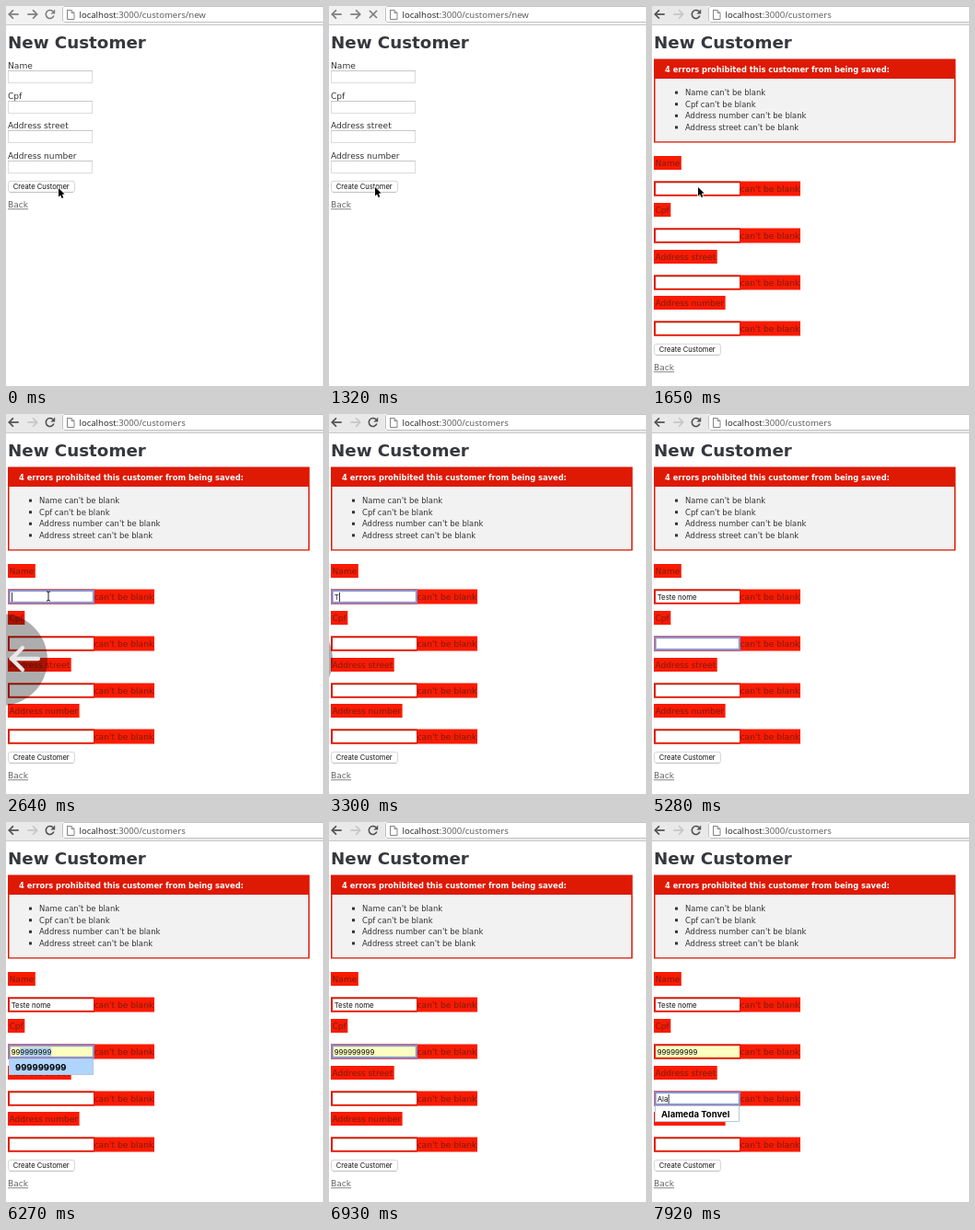
Recreate the animation shown at these times as an HTML page with a canvas. Size 344x413 px, loop 8 s.

```html
<!DOCTYPE html>
<html lang="en">
<head>
<meta charset="utf-8">
<title>New Customer</title>
<style>
html, body { margin: 0; width: 100%; height: 100%; overflow: hidden; background: #fff; }
canvas { display: block; width: 344px; height: 413px; }
</style>
</head>
<body>
<canvas id="stage"></canvas>
<script>
const W = 344, H = 413, LOOP = 8000, STEP = 330;
const canvas = document.getElementById('stage');
const ctx = canvas.getContext('2d');
const ratio = window.devicePixelRatio || 1;
canvas.width = W * ratio;
canvas.height = H * ratio;

const PAGE = '"DejaVu Sans", sans-serif';
const UI = 'Inter, sans-serif';
const RED = '#f91b02', BORDER = '#de1904', ON_RED = '#7c1c10';
const LABELS = ['Name', 'Cpf', 'Address street', 'Address number'];
const SUGGESTIONS = { 1: '999999999', 2: 'Alameda Tonvel' };

// Each entry holds from its time until the next one.
const STATES = [
  { at: 0, page: 'new', cursor: 'arrow', x: 57, y: 198 },
  { at: 330, x: 50, y: 197 },
  { at: 1320, loading: true },
  { at: 1650, page: 'errors', loading: false },
  { at: 1980, cursor: 'beam', x: 46, y: 198 },
  { at: 2640, focus: 0, caret: true, swipe: -5 },
  { at: 2970, swipe: -25 },
  { at: 3300, swipe: -46, cursor: null, name: 'T' },
  { at: 3630, swipe: null, name: 'Te' },
  { at: 3960, name: 'Teste' },
  { at: 4290, name: 'Teste n' },
  { at: 4620, name: 'Teste nome' },
  { at: 4950, focus: 1 },
  { at: 5280, caret: false },
  { at: 5610, caret: true, cpf: '99', menu: 1 },
  { at: 6270, cpf: '999999999', caret: false, picked: true, filled: true },
  { at: 6600, caret: true, picked: false, menu: null },
  { at: 6930, caret: false },
  { at: 7260, focus: 2, caret: true },
  { at: 7590, street: 'A' },
  { at: 7920, street: 'Ala', menu: 2 }
];

function stateAt(t) {
  return Object.assign({}, ...STATES.filter(s => s.at <= t));
}

function rect(x, y, w, h, fill) {
  ctx.fillStyle = fill;
  ctx.fillRect(x, y, w, h);
}

function frame(x, y, w, h, color, width = 1) {
  ctx.strokeStyle = color;
  ctx.lineWidth = width;
  ctx.strokeRect(x + width / 2, y + width / 2, w - width, h - width);
}

function text(str, x, y, size, color = '#333', family = PAGE, weight = 400) {
  ctx.font = `${weight} ${size}px ${family}`;
  ctx.fillStyle = color;
  ctx.fillText(str, x, y);
  return ctx.measureText(str).width;
}

function path(points, color, width = 1) {
  ctx.beginPath();
  points.forEach(([x, y]) => ctx.lineTo(x, y));
  ctx.strokeStyle = color;
  ctx.lineWidth = width;
  ctx.stroke();
}

function navArrow(x, dir, color) {
  const tip = x + dir * 5.2;
  path([[x - dir * 5.2, 9], [tip, 9]], color, 1.7);
  path([[tip - dir * 4.6, 4.4], [tip, 9], [tip - dir * 4.6, 13.6]], color, 1.7);
}

function toolbar(s) {
  const fresh = s.page === 'new';
  const icon = fresh ? '#7d7d7d' : '#505050';
  rect(0, 0, W, 20, fresh ? '#f2f2f2' : '#e9e9e9');
  rect(0, 20, W, 1, '#c8c8c8');
  rect(61, 0, W - 61, 18, '#fff');
  path([[W, 17.5], [63, 17.5], [61.5, 16], [61.5, 2], [63, 0.5], [W, 0.5]], '#c2c2c2');
  navArrow(8.5, -1, icon);
  navArrow(28.5, 1, fresh ? icon : '#c6c6c6');
  if (s.loading) {
    path([[44, 5], [52, 13]], icon, 1.7);
    path([[52, 5], [44, 13]], icon, 1.7);
  } else {
    ctx.beginPath();
    ctx.arc(47.7, 9, 4.4, 0.35, 5.5);
    ctx.strokeStyle = icon;
    ctx.lineWidth = 1.6;
    ctx.stroke();
    ctx.fillStyle = icon;
    ctx.beginPath();
    ctx.moveTo(53.2, 3.6);
    ctx.lineTo(53.2, 8.4);
    ctx.lineTo(48.4, 8.4);
    ctx.fill();
  }
  path([[66.5, 4.5], [71, 4.5], [74, 7.5], [74, 14.5], [66.5, 14.5], [66.5, 4]], '#858585');
  path([[71, 4.5], [71, 7.5], [74, 7.5]], '#858585');

  const font = '"Open Sans", sans-serif';
  const host = text('localhost', 79.5, 12.6, 9.6, '#222', font);
  text(fresh ? ':3000/customers/new' : ':3000/customers', 79.5 + host, 12.6, 9.6, '#555', font);
}

function submitArea(y) {
  ctx.beginPath();
  ctx.roundRect(2.5, y + 0.3, 72, 12, 2.5);
  ctx.fillStyle = '#fff';
  ctx.fill();
  ctx.strokeStyle = '#d6d6d6';
  ctx.lineWidth = 1;
  ctx.stroke();
  rect(4, y + 12.2, 69, 0.8, '#bdbdbd');
  text('Create Customer', 7.7, y + 9, 7.6, '#111', UI);
  const w = text('Back', 2, y + 29, 9.1, '#666');
  rect(2, y + 30.3, w, 0.9, '#777');
}

function blankForm() {
  LABELS.forEach((label, i) => {
    const y = 67.7 + i * 32.8;
    text(label, 2, y, 9.1);
    const top = Math.round(y + 2);
    frame(2, top, 92, 14, '#dcdcdc');
    rect(2, top, 92, 1, '#c8c8c8');
  });
  submitArea(190);
}

function errorBox() {
  rect(2, 57.5, 327.5, 91, BORDER);
  rect(3.5, 79, 324.5, 68.2, '#f2f2f2');
  text('4 errors prohibited this customer from being saved:', 14, 72, 8.3, '#fff', PAGE, 700);
  [0, 1, 3, 2].forEach((field, i) => {
    const y = 97 + i * 12.6;
    rect(25, y - 4.4, 3, 3, '#333');
    text(LABELS[field] + " can't be blank", 36, y, 8.44);
  });
}

function field(i, value, s) {
  const y = 191 + i * 50.8;
  const top = Math.round(y);
  const focused = s.focus === i;
  const labelTop = Math.round(y - 28);
  ctx.font = `9.1px ${PAGE}`;
  rect(2, labelTop, ctx.measureText(LABELS[i]).width + 3, 15, RED);
  text(LABELS[i], 3.5, labelTop + 11, 9.1, ON_RED);

  rect(2, top - 0.5, 159, 16, RED);
  text("can't be blank", 95.6, top + 10.8, 9.15, ON_RED);
  frame(2, top - 0.5, 94, 16, BORDER, 1.5);
  rect(4, top + 1.2, 91, 12.6, i === 1 && s.filled ? '#fafebe' : '#fff');
  if (focused) {
    frame(2, top - 0.5, 94, 16, '#9c80b8', 1.5);
    frame(3.5, top + 1, 91.5, 13, '#8b9fd4', 1.2);
  } else {
    rect(4, top + 1.2, 91, 0.8, '#d0c0bc');
  }
  if (i === 1 && s.picked) {
    ctx.font = `7.8px ${UI}`;
    const start = ctx.measureText('99').width;
    rect(5.7 + start, top + 3, ctx.measureText(value).width - start, 10, '#b3d3ec');
  }
  const w = text(value, 5.7, top + 10.6, 7.8, '#111', UI);
  if (focused && s.caret) rect(6 + w, top + 3, 0.9, 10, '#222');
}

function suggestion(i, picked) {
  const y = Math.round(191 + i * 50.8) + 15;
  rect(3, y, 92, 18, picked ? '#b0d5fd' : '#fff');
  frame(3, y, 92, 18, '#b4c8dc');
  text(SUGGESTIONS[i], 10, y + 12.8, 9.5, '#000', UI, 700);
}

function swipeBadge(x) {
  ctx.fillStyle = 'rgba(0,0,0,.32)';
  ctx.beginPath();
  ctx.arc(x, 267, 50, 0, Math.PI * 2);
  ctx.fill();
  ctx.lineCap = 'round';
  const tip = x + 11;
  path([[tip, 266], [tip + 29, 266]], '#e9e9e9', 4.3);
  path([[tip + 12, 254], [tip, 266], [tip + 12, 278]], '#e9e9e9', 4.3);
  ctx.lineCap = 'butt';
}

function pointer(s) {
  ctx.save();
  ctx.translate(s.x, s.y);
  if (s.cursor === 'arrow') {
    ctx.beginPath();
    [[0, 0], [0, 9.4], [2.1, 7.4], [3.6, 11], [5.3, 10.2], [3.8, 6.8], [6.6, 6.6]]
      .forEach(([x, y]) => ctx.lineTo(x, y));
    ctx.closePath();
    ctx.strokeStyle = '#fff';
    ctx.lineWidth = 1.4;
    ctx.stroke();
    ctx.fillStyle = '#000';
    ctx.fill();
  } else {
    path([[0, -4.5], [0, 4.5]], '#222');
    path([[-2, -5.2], [0, -4.4], [2, -5.2]], '#222');
    path([[-2, 5.2], [0, 4.4], [2, 5.2]], '#222');
  }
  ctx.restore();
}

function draw(t) {
  const s = stateAt(t);
  ctx.setTransform(ratio, 0, 0, ratio, 0, 0);
  rect(0, 0, W, H, '#fff');
  toolbar(s);
  text('New Customer', 2, 45.7, 18.25, '#36383d', PAGE, 700);
  if (s.page === 'new') {
    blankForm();
  } else {
    errorBox();
    [s.name, s.cpf, s.street, ''].forEach((value, i) => field(i, value || '', s));
    submitArea(367);
    if (s.menu) suggestion(s.menu, s.picked);
    if (s.swipe != null) swipeBadge(s.swipe);
  }
  if (s.cursor) pointer(s);
}

const start = performance.now();
function tick() {
  const t = (performance.now() - start) % LOOP;
  draw(Math.floor(t / STEP) * STEP);
  requestAnimationFrame(tick);
}
tick();
</script>
</body>
</html>
```
